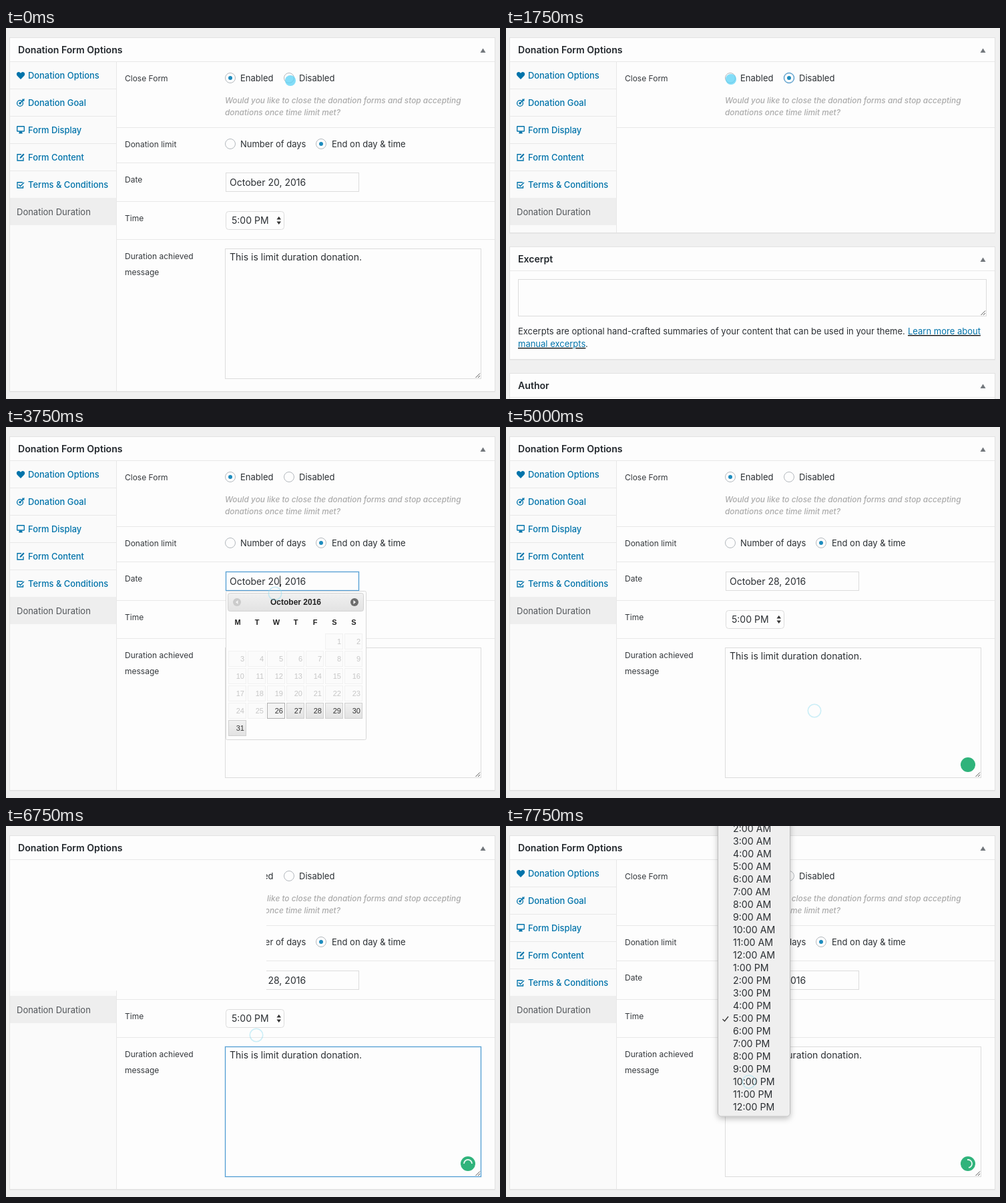
These frames come from a looping animation (740 by 557 pixels, 8 s). An HTML page:

```html
<!DOCTYPE html>
<html lang="en">
<head>
<meta charset="utf-8">
<title>Donation form options</title>
<style>
  html, body { margin: 0; width: 100%; height: 100%; overflow: hidden; background: #f0f0f0; }
  svg { display: block; width: 740px; height: 557px; }
  text { font: 400 13px Inter, Roboto, sans-serif; fill: #2b2f33; white-space: pre; }
  .title { font-size: 14.1px; font-weight: 600; fill: #23282d; }
  .link { fill: #0073aa; }
  .nav { font-size: 12.9px; font-weight: 500; }
  .label { font-size: 12px; fill: #34383c; }
  .hint { font-size: 11.85px; font-weight: 500; font-style: italic; fill: #aaa; }
  .field { font-size: 14px; }
  .option { font-size: 14.2px; }
  .current { fill: #505458; }
  .cal text { font: 400 11px "Liberation Sans", Arial, sans-serif; text-anchor: end; fill: #333; }
  .cal .head { font-weight: 700; text-anchor: middle; fill: #222; }
  .cal .month { font-size: 12px; }
  .cal .off { fill: #c6c6c6; }
  .line { stroke: #e8e8e8; }
  .box { fill: #fdfdfd; stroke: #dcdcdc; }
  .glow { fill: none; stroke: #4f9bd4; }
  .halo { fill: none; stroke: #1e8cbe; stroke-opacity: .15; stroke-width: 2.5; }
  .icon { fill: none; stroke: #0073aa; stroke-width: 1.35; }
  .solid { fill: #0073aa; }
</style>
</head>
<body>
<svg id="stage" viewBox="0 0 740 557" xmlns="http://www.w3.org/2000/svg"></svg>
<script>
const LOOP = 8000, STEP = 250;

const text = (x, y, str, cls = '') =>
  `<text x="${x}" y="${y}" class="${cls}">${str.replace(/&/g, '&amp;')}</text>`;
const rect = (x, y, w, h, attrs) =>
  `<rect x="${x}" y="${y}" width="${w}" height="${h}" ${attrs}/>`;
const hline = (x1, x2, y) => `<path class="line" d="M${x1} ${y}H${x2}"/>`;
const path = (d, attrs) => `<path d="${d}" ${attrs}/>`;
const circle = (x, y, r, attrs) => `<circle cx="${x}" cy="${y}" r="${r}" ${attrs}/>`;
const group = (id, body, attrs = '') => `<g id="${id}" ${attrs}>${body}</g>`;

const panel = (y, h) =>
  rect(5.5, y + 1.5, 727, h, 'fill="none" stroke="#000" stroke-opacity=".035"') +
  rect(5.5, y + .5, 727, h, 'fill="#fdfdfd" stroke="#e2e2e2"');
const heading = (y, str) =>
  text(18, y + 24, str, 'title') + hline(6, 732, y + 36.5) +
  path(`M710.5 ${y + 23}h8l-4 -6.5z`, 'fill="#72777c"');
const sidebar = bottom =>
  rect(6, 51, 159, bottom - 51, 'fill="#fafafa"') +
  path(`M165.5 51V${bottom}`, 'class="line"');
const grip = (x, y) =>
  path(`M${x - 6.5} ${y}l6.5 -6.5M${x - 3} ${y}l3 -3`, 'stroke="#555" fill="none"');
const ring = (x, y) => circle(x, y, 7.5, 'fill="#fdfdfd" stroke="#b4b9be"');
const dot = (x, y) => circle(x, y, 3, 'fill="#1e8cbe"');
const radioFocus = x => circle(x, 75, 7.5, 'class="halo"') + circle(x, 75, 7.5, 'class="glow"');
const boxFocus = (x, y, w, h) =>
  rect(x, y, w, h, 'class="halo"') + rect(x, y, w, h, 'class="glow"');

function navigation() {
  const items = ['Donation Options', 'Donation Goal', 'Form Display', 'Form Content', 'Terms & Conditions'];
  const links = items.map((name, i) =>
    text(33, 76 + 41 * i, name, 'link nav') + hline(6, 165, 91.5 + 41 * i)).join('');
  const icons =
    path('M22 77L17 72C14.500 69 16.500 66 19 66C20.500 66 21.500 67 22 68C22.500 67 23.500 66 25 66C27.500 66 29.500 69 27 72Z', 'class="solid"') +
    circle(21, 113, 4.4, 'class="icon"') + circle(21, 113, 1.8, 'class="solid"') +
    path('M21 113L27.500 106.500M25 106.500v2.500h2.500', 'class="icon"') +
    rect(16.7, 147.7, 10.6, 7.3, 'class="icon" rx=".6"') + path('M20 155.500h4l.8 3h-5.600z', 'class="solid"') +
    path('M23 189.700H17V199H26V194.500', 'class="icon"') +
    path('M20.500 196l.5 -2.300L26 188.500l1.600 1.600L22.600 195.400z', 'class="solid"') +
    path('M25 231.700H17V240H25.500V237M19 235l2.500 2.500L27 232', 'class="icon"');
  return links + icons + rect(6, 255, 159, 41, 'fill="#eeeeee"') +
    text(16, 281, 'Donation Duration', 'current');
}

function details() {
  const arrows = path('M405.500 287.500h6.500l-3.250 -4.500zM405.500 290.500h6.500l-3.250 4.500z', 'fill="#333"');
  return hline(166, 732, 202.5) + hline(166, 732, 260.5) + hline(166, 732, 317.5) +
    text(178, 179, 'Donation limit', 'label') +
    ring(336, 174) + text(351, 179, 'Number of days') +
    ring(472, 174) + dot(472, 174) + text(488, 179, 'End on day & time') +
    text(178, 232, 'Date', 'label') + rect(329.5, 217.5, 199, 28, 'class="box"') +
    group('dateFocus', boxFocus(329.5, 217.5, 199, 28)) +
    '<text id="date" class="field" x="335" y="237"></text>' +
    group('dateCaret', path('M410.500 223.500V240', 'stroke="#222"')) +
    text(178, 290, 'Time', 'label') +
    rect(329.5, 275.5, 87, 27, 'class="box" rx="4"') + text(338, 294, '5:00 PM', 'field') + arrows +
    text(178, 347, 'Duration achieved', 'label') + text(178, 371, 'message', 'label') +
    rect(328.5, 331.5, 383, 195, 'class="box"') +
    group('noteFocus', boxFocus(328.5, 331.5, 383, 195)) +
    text(335, 349, 'This is limit duration donation.', 'field') +
    group('noteCaret', path('M534.500 335V351.500', 'stroke="#222"')) + grip(710, 525) +
    group('badge', circle(692, 507, 11, 'fill="#2fb37b"') +
      group('spinner', path('M686 507A6 6 0 0 1 698 507', 'fill="none" stroke="#e6f7ef" stroke-width="1.8"')));
}

function lowerPanels() {
  return panel(328, 169) + heading(328, 'Excerpt') +
    rect(18.5, 377.5, 701, 55, 'class="box"') + grip(718, 431) +
    text(18, 460, 'Excerpts are optional hand-crafted summaries of your content that can be used in your theme.') +
    `<g text-decoration="underline">${text(602, 460, 'Learn more about', 'link')}${text(18, 479, 'manual excerpts', 'link')}</g>` +
    text(119, 479, '.') + panel(518, 60) + heading(518, 'Author');
}

function calendar() {
  let out = rect(329.5, 246.5, 210, 223, 'fill="#fdfdfd" stroke="#d8d8d8" rx="2"') +
    rect(332.5, 249.5, 203, 27, 'fill="url(#bar)" stroke="#d2d2d2" rx="3"') +
    circle(346, 263, 6, 'fill="#cbcbcb"') + path('M347.500 260v6l-3.500 -3z', 'fill="#f4f4f4"') +
    circle(522, 263, 6, 'fill="#6e6e6e"') + path('M520.500 260v6l3.500 -3z', 'fill="#fff"') +
    text(434, 267, 'October 2016', 'head month');
  [...'MTWTFSS'].forEach((d, i) => out += text(347 + 29 * i, 297, d, 'head'));
  for (let day = 1; day <= 31; day++) {
    const n = day + 4, x = 333 + 29 * (n % 7), y = 310 + 26 * Math.floor(n / 7);
    const past = day < 26, today = day === 26;
    const look = past ? 'fill="#fbfbfb" stroke="#f1f1f1"'
      : today ? 'fill="#f3f3f3" stroke="#b0b0b0"' : 'fill="url(#bar)" stroke="#d0d0d0"';
    out += rect(x + .5, y + .5, 26, 23, look) + text(x + 24, y + 16, String(day), past ? 'off' : '');
  }
  return out;
}

function timeMenu() {
  let out = rect(317.5, -20, 108, 456, 'rx="5" fill="#efefef" stroke="#bdbdbd" filter="url(#shade)"');
  for (let i = 0; i < 23; i++) {
    const hour = i + 2;
    out += text(340, 9 + 19 * i, `${hour > 12 ? hour - 12 : hour}:00 ${hour > 12 ? 'PM' : 'AM'}`, 'option');
  }
  return out + path('M324.500 290l3 3L333 286', 'fill="none" stroke="#333" stroke-width="1.3"');
}

document.getElementById('stage').innerHTML = `<defs>
  <linearGradient id="bar" x2="0" y2="1"><stop stop-color="#f1f1f1"/><stop offset="1" stop-color="#e2e2e2"/></linearGradient>
  <filter id="shade" x="-20%" y="-5%" width="140%" height="112%"><feDropShadow dx="0" dy="3" stdDeviation="4" flood-opacity=".25"/></filter>
  </defs>` +
  rect(0, 0, 740, 557, 'fill="#f0f0f0"') +
  group('tall', panel(14, 531) + sidebar(545)) +
  group('short', panel(14, 293) + sidebar(307) + lowerPanels()) +
  heading(14, 'Donation Form Options') + navigation() + hline(166, 732, 149.5) +
  text(178, 80, 'Close Form', 'label') +
  ring(336, 75) + text(351, 80, 'Enabled') + ring(424, 75) + text(439, 80, 'Disabled') +
  group('onFocus', radioFocus(336)) + group('offFocus', radioFocus(424)) +
  group('onDot', dot(336, 75)) + group('offDot', dot(424, 75)) +
  text(328, 113, 'Would you like to close the donation forms and stop accepting', 'hint') +
  text(328, 131, 'donations once time limit met?', 'hint') +
  group('details', details()) + group('calendar', calendar(), 'class="cal"') +
  group('blank', rect(6, 51, 384, 196, 'fill="#fdfdfd"')) + group('menu', timeMenu()) +
  group('pointer',
    group('press', circle(0, 0, 8, 'fill="#5ad2f6" fill-opacity=".75"')) +
    group('hover', circle(0, 0, 9.7, 'fill="none" stroke="#8fdcf0" stroke-opacity=".45" stroke-width="1.6"')));

// Time spans in ms during which each part is visible
const spans = {
  tall: [[0, 500], [2000, LOOP]], details: [[0, 500], [2000, LOOP]], short: [[500, 2000]],
  onDot: [[0, 500], [2000, LOOP]], offDot: [[500, 2000]],
  onFocus: [[2000, 3500]], offFocus: [[500, 2000]],
  dateFocus: [[3500, 5000]], dateCaret: [[3500, 4000], [4500, 5000]], calendar: [[3500, 5000]],
  badge: [[5000, LOOP]], spinner: [[6500, LOOP]],
  noteFocus: [[5750, 7000]], noteCaret: [[5750, 6250]],
  blank: [[6750, 7000]], menu: [[7250, LOOP]],
  press: [[0, 500], [1750, 2000], [3250, 3500], [4750, 5000], [5500, 5750], [7000, 7250]]
};

// Pointer stops: time, x, y
const route = [
  [0, 426, 79], [500, 425, 80], [750, 422, 100], [1000, 402, 104], [1500, 340, 79], [1750, 337, 77],
  [2000, 338, 80], [2250, 344, 102], [3000, 399, 229], [3250, 402, 233], [3500, 402, 235],
  [3750, 403, 250], [4500, 462, 424], [5000, 462, 426], [5500, 418, 416], [6000, 414, 414],
  [6500, 378, 326], [6750, 375, 314], [7000, 373, 291], [7250, 373, 293], [7750, 364, 384], [LOOP, 364, 384]
];

const el = id => document.getElementById(id);
const within = (id, t) => spans[id].some(([a, b]) => t >= a && t < b);
const ease = k => k * k * (3 - 2 * k);

function pointerAt(t) {
  const i = route.findIndex(stop => stop[0] > t);
  const [t0, x0, y0] = route[i - 1], [t1, x1, y1] = route[i];
  const k = ease((t - t0) / (t1 - t0));
  return [x0 + (x1 - x0) * k, y0 + (y1 - y0) * k];
}

function render(now) {
  const step = Math.floor((now % LOOP) / STEP) * STEP;
  const t = step < 500 ? 0 : step;
  for (const id in spans) el(id).style.display = within(id, t) ? '' : 'none';
  el('hover').style.display = within('press', t) ? 'none' : '';
  el('date').textContent = t >= 5000 ? 'October 28, 2016' : 'October 20, 2016';
  el('spinner').setAttribute('transform', `rotate(${(t - 6750) * .44} 692 507)`);
  el('pointer').setAttribute('transform', `translate(${pointerAt(t)})`);
}

const start = performance.now();
function tick() {
  render(performance.now() - start);
  requestAnimationFrame(tick);
}
tick();
</script>
</body>
</html>
```
